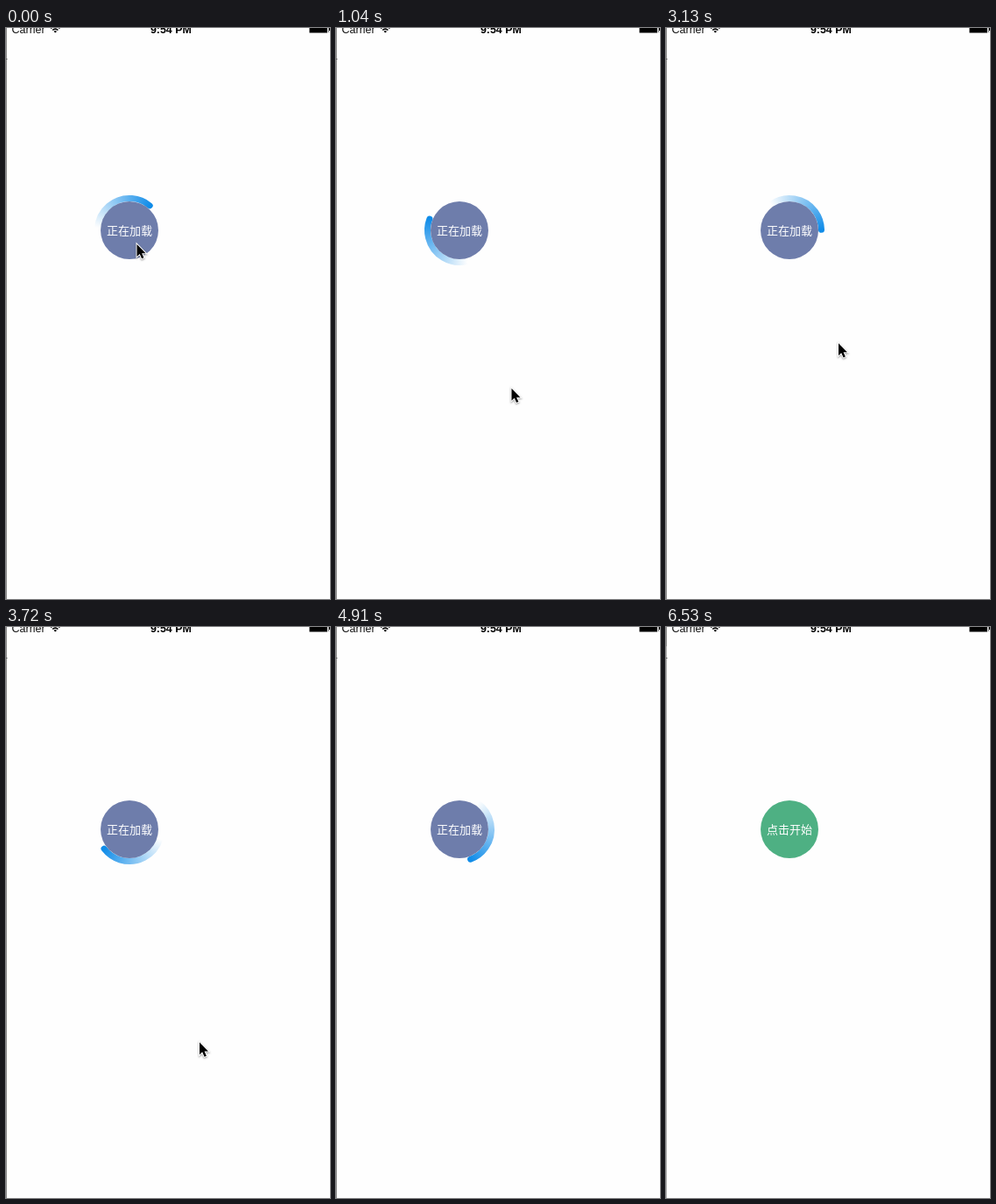
Animation, 370 px wide and 652 px high, one loop 6.61 s. Source, as an HTML page with a canvas:

```html
<!DOCTYPE html>
<html lang="zh">
<head>
<meta charset="utf-8">
<title>Loading button</title>
<style>
html, body { margin: 0; width: 100%; height: 100%; overflow: hidden; background: #fefefe; }
canvas { display: block; }
</style>
</head>
<body>
<canvas width="370" height="652"></canvas>
<script>
const ctx = document.querySelector('canvas').getContext('2d');
const LOOP = 6610, TICK = 148.9, TURN = 35.9;
const CX = 141, CY = 231, RAD = Math.PI / 180;

// Pointer stops: tick, x, y
const pointerStops = [
  [0, 149.5, 247], [2, 149.5, 247], [5, 196, 395], [7, 200.5, 411.5], [8, 200.5, 411.5],
  [9, 207, 412], [11, 207, 412], [15, 148.5, 256], [17, 149, 250], [19, 150, 252],
  [21, 197, 360], [24, 205, 410], [27, 253, 603], [29, 314.5, 648.5], [30, 350, 680]
];

function pointerAt(tick) {
  const next = pointerStops.findIndex(stop => stop[0] > tick);
  if (next < 0) return null;
  const [t0, x0, y0] = pointerStops[next - 1], [t1, x1, y1] = pointerStops[next];
  const p = (tick - t0) / (t1 - t0);
  return [x0 + (x1 - x0) * p, y0 + (y1 - y0) * p];
}

function rect(color, x, y, w, h) {
  ctx.fillStyle = color;
  ctx.fillRect(x, y, w, h);
}

function text(str, x, y, font, color, align) {
  ctx.font = font;
  ctx.fillStyle = color;
  ctx.textAlign = align;
  ctx.fillText(str, x, y);
}

function arc(radius, from, to, style, width, x = CX, y = CY) {
  ctx.beginPath();
  ctx.arc(x, y, radius, from * RAD, to * RAD);
  ctx.strokeStyle = style;
  ctx.lineWidth = width;
  ctx.stroke();
}

function drawStatusBar() {
  text('Carrier', 6.5, 6, '12.5px "Liberation Sans", Arial, sans-serif', '#111', 'left');
  text('9:54 PM', 188.3, 6, 'bold 12.4px "Liberation Sans", Arial, sans-serif', '#000', 'center');
  ctx.lineCap = 'butt';
  for (const r of [1.2, 4.4, 7.4]) arc(r, -135, -45, '#000', r < 2 ? 2.4 : 1.7, 56.3, 5.6);
  rect('#000', 346.5, 0, 20.5, 5.5);
  rect('#777', 368, 0, 1, 5);
  rect('#000', 369, 0, 1, 3);
}

function drawEdge(pale) {
  rect('#8c8c8c', 0, 0, 1, 652);
  if (pale) rect('#b0b0b0', 0, 22, 1, 630);
  rect('#555', 0, 35, 1.5, 1);
}

function drawRing(head) {
  const blue = 'rgb(16,140,232)', clear = 'rgba(16,140,232,0)', span = 125;
  const fade = ctx.createConicGradient((head - span) * RAD, CX, CY);
  fade.addColorStop(0, clear);
  fade.addColorStop(span / 360, blue);
  fade.addColorStop(0.5, blue);
  fade.addColorStop(0.5, clear);
  ctx.lineCap = 'round';
  arc(36.5, head - span, head, fade, 7);
}

function drawButton(label, color) {
  ctx.beginPath();
  ctx.arc(CX, CY, 33, 0, 7);
  ctx.fillStyle = color;
  ctx.fill();
  text(label, CX, 235.7, '300 13px "Noto Sans CJK SC", "Noto Sans CJK", sans-serif', '#fff', 'center');
}

function drawPointer([x, y]) {
  const shape = new Path2D('M0 0V14L3.2 11L5.6 16.3L7.9 15.3L5.6 10.2H10Z');
  ctx.save();
  ctx.translate(x, y);
  ctx.shadowColor = 'rgba(0,0,0,.4)';
  ctx.shadowBlur = 2;
  ctx.shadowOffsetY = 1;
  ctx.strokeStyle = '#fff';
  ctx.lineWidth = 2;
  ctx.stroke(shape);
  ctx.shadowColor = 'transparent';
  ctx.fillStyle = '#000';
  ctx.fill(shape);
  ctx.restore();
}

function draw(now) {
  const time = now % LOOP;
  const tick = Math.floor((time + 5) / TICK);
  const firstRun = tick < 9;
  const loading = firstRun || (tick >= 19 && tick < 39);

  rect('#fefefe', 0, 0, 370, 652);
  drawEdge(time >= 6530);
  drawStatusBar();
  if (loading) drawRing(firstRun ? -50.5 + TURN * tick : -1 + TURN * (tick - 21));
  drawButton(loading ? '正在加载' : '点击开始', loading ? '#6e7dab' : '#4eb083');
  const pointer = pointerAt(tick);
  if (pointer) drawPointer(pointer);
}

const start = performance.now();
function frame() {
  draw(performance.now() - start);
  requestAnimationFrame(frame);
}
frame();
</script>
</body>
</html>
```
